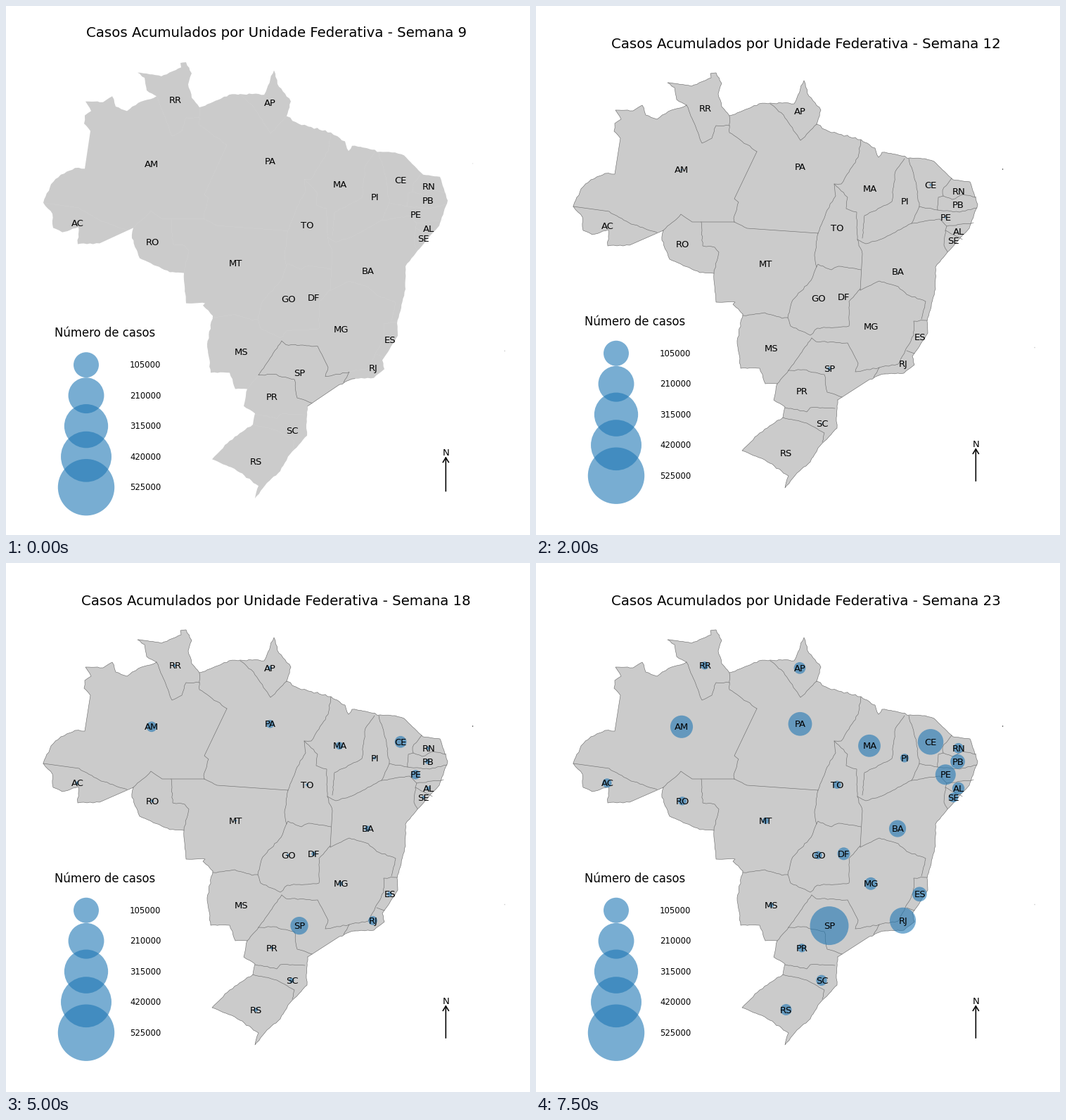
Animation of 745x752 px, one loop 8 s. Source, as a matplotlib script:

```python
import math
import random

import matplotlib.pyplot as plt
from matplotlib.animation import FuncAnimation
from matplotlib.patches import Circle, Polygon

W, H, DPI = 745, 752, 128
PT = 72 / DPI            # points per pixel
MID = 390                # map row that stays put while the height changes
STRETCH = {9: 1.051, 10: 1.0135, 11: 1.0072}
LAST_WEEK = 23
LAND, DARK, LIGHT, BLUE = "#cbcbcb", "#6a6a6a", "#e0e0e0", "#1f77b4"

# state: label position and thousands of cases in the last week
STATES = {
    "RR": (240, 145.5, 6), "AP": (375, 149, 13), "AM": (207, 232.5, 48),
    "PA": (375.5, 228.5, 53), "MA": (474, 259.5, 47), "CE": (561, 254, 62),
    "RN": (600.5, 263, 10), "PI": (524, 277, 7), "PB": (599.5, 282, 20),
    "PE": (582.3, 300.5, 39), "AL": (600.5, 320, 14), "SE": (593.5, 333, 9),
    "TO": (428, 315, 6), "AC": (101, 312.5, 8), "RO": (208, 338, 7),
    "MT": (326.5, 366, 4), "BA": (514, 377.3, 27), "GO": (401, 415, 6),
    "DF": (437.5, 413, 15), "MG": (476, 455.5, 15), "ES": (545.3, 470.5, 20),
    "MS": (334.5, 486, 2), "SP": (417, 515.3, 140), "RJ": (521.5, 508, 64),
    "PR": (378, 547, 7), "SC": (406, 593, 11), "RS": (355.5, 634.7, 12),
}
EARLY_HIT = {"SP", "AM", "CE", "PE", "SC"}   # these grow more slowly later on


def cases(state, week):
    """Thousands of cases: doublings counted back from the last week."""
    back = LAST_WEEK - week
    rate = .4 if state in EARLY_HIT else .57
    return STATES[state][2] * 2 ** -(rate * back + .0019 * back ** 3)


rng = random.Random(4)
outline, coasts, borders = [], [], []


def rough(points, amp):
    """Join key points with small irregular steps; long stretches stay straight."""
    path = [points[0]]
    for (x0, y0), (x1, y1) in zip(points, points[1:]):
        length = math.hypot(x1 - x0, y1 - y0)
        steps = max(1, int(length / 4)) if length < 48 else 1
        for i in range(1, steps):
            t = i / steps
            path.append((x0 + (x1 - x0) * t + rng.uniform(-amp, amp),
                         y0 + (y1 - y0) * t + rng.uniform(-amp, amp)))
        path.append((x1, y1))
    return path


def coast(week, *points, amp=.8):
    path = rough(points, amp)
    outline.extend(path)
    coasts.append((week, path))


def border(week, *points):
    borders.append((week, rough(points, .8)))


# Outer edge, clockwise from the far west; the number is the week it turns dark.
coast(11, (53, 285), (64, 260), (78, 247), (98, 238), (112, 239), (120, 188), (111, 178),
      (112, 167), (121, 161), (113, 148), (138, 149), (151, 141), (156, 155), (172, 161),
      (188, 150), (214, 141))
coast(12, (214, 141), (200, 133), (197, 116), (187, 109), (221, 114), (249, 102),
      (248, 96), (256, 95), (264, 110), (259, 125), (264, 143), (275, 156), (298, 147),
      (317, 139), (350, 138), (367, 139), (381, 106), (388, 128), (405, 148), (399, 168))
coast(12, (399, 168), (412, 176), (430, 182), (462, 190), (482, 202), (487, 215),
      (492, 208), (532, 216), amp=1.3)
coast(11, (532, 216), (553, 217), (566, 221), (593, 247), (617, 250), (628, 282),
      (616, 316), (585, 350), amp=.4)
coast(10, (585, 350), (568, 371), (568, 402), (556, 448), (557, 465), (535, 498),
      (538, 510), (523, 522), (496, 523), amp=.5)
coast(9, (496, 523), (474, 531), (429, 560), amp=1.3)
coast(11, (429, 560), (427, 585), (428, 600), (404, 625), (390, 648), (371, 664),
      (354, 685), (359, 668), (325, 645), (293, 632), (318, 607), (351, 585), (354, 570),
      (338, 560), (343, 537), (326, 537), (318, 515), (291, 515), (286, 476), (294, 438))
coast(12, (294, 438), (280, 424), (283, 421), (256, 421), (253, 380), (233, 379),
      (190, 360), (179, 333), (181, 319), (133, 340), (102, 341), (103, 318), (80, 325),
      (67, 319), (66, 300), (53, 285))

# Inner borders: north
border(11, (53, 285), (104, 292), (132, 308), (172, 322))
border(12, (181, 319), (206, 296), (222, 307), (282, 307))
border(12, (235, 307), (237, 341), (254, 343), (260, 350), (253, 380))
border(12, (282, 307), (281, 302), (288, 279), (282, 274), (314, 207))
border(12, (214, 141), (222, 160), (236, 195), (250, 188), (256, 170), (275, 170))
border(12, (275, 156), (275, 180), (314, 207))
border(12, (333, 139), (352, 155), (376, 191), (399, 168))
border(12, (282, 307), (300, 316), (401, 323))
border(12, (401, 323), (414, 290), (426, 270), (424, 253), (434, 253), (458, 215),
       (462, 190))
border(12, (424, 253), (443, 272), (441, 288), (456, 293), (457, 332))
border(12, (464, 330), (467, 298), (506, 278), (511, 235), (524, 217))
border(12, (401, 323), (396, 355), (399, 371))

# Inner borders: north-east
border(11, (530, 217), (541, 255), (545, 285), (534, 309))
border(10, (457, 332), (464, 352), (461, 404))
border(10, (457, 332), (469, 338), (492, 331), (534, 309), (574, 303), (584, 313),
       (582, 319), (580, 340), (585, 349))
border(11, (545, 285), (571, 290), (572, 272), (579, 270), (578, 262), (591, 245))
border(11, (579, 270), (592, 275), (607, 268), (626, 272))
border(11, (571, 290), (602, 293), (627, 287))
border(11, (584, 313), (622, 308))
border(11, (582, 319), (606, 332))

# Inner borders: centre and south
border(11, (462, 375), (430, 370), (420, 375), (401, 367), (391, 390), (365, 418),
       (358, 443), (362, 455), (390, 468), (400, 458), (445, 455), (445, 420), (461, 402))
border(11, (294, 440), (325, 436), (350, 444), (358, 443))
border(9, (392, 472), (378, 492), (359, 518))
border(11, (359, 518), (343, 537))
border(9, (392, 472), (398, 477), (443, 479), (458, 508), (454, 520), (488, 514),
       (480, 528))
border(10, (488, 514), (515, 509), (537, 468), (537, 448), (556, 447))
border(10, (527, 490), (538, 494))
border(10, (461, 404), (488, 391), (515, 399), (527, 410), (554, 420), (548, 445))
border(9, (359, 518), (380, 517), (410, 524), (414, 549), (435, 556))
border(11, (354, 571), (385, 577), (390, 571), (425, 572))
border(11, (351, 585), (385, 593), (410, 607), (407, 620))

plt.rcParams["font.family"] = "DejaVu Sans"
fig = plt.figure(figsize=(W / DPI, H / DPI), dpi=DPI, facecolor="white")
ax = fig.add_axes([0, 0, 1, 1])


def draw(frame):
    week = max(9, 8 + frame)
    scale = STRETCH.get(week, 1)
    shift = 323 * (scale - 1)

    def fit(y):
        return MID + (y - MID) * scale

    def text(x, y, label, size):
        ax.text(x, y, label, size=size * PT, ha="center", va="baseline", zorder=5)

    def line(path, color, width):
        ax.plot(*zip(*path), color=color, lw=width * PT, snap=False, zorder=2)

    def map_line(path, color, width):
        line([(x, fit(y)) for x, y in path], color, width)

    def bubble(x, y, radius):
        ax.add_patch(Circle((x, y), radius, fc=BLUE, alpha=.6, lw=0, zorder=3))

    ax.clear()
    ax.set(xlim=(0, W), ylim=(H, 0))
    ax.axis("off")

    ax.add_patch(Polygon([(x, fit(y)) for x, y in outline], fc=LAND, lw=0, zorder=1))
    for start, path in borders:
        if week < start:
            map_line(path, LIGHT, .7 if week == 11 else .15)
    for start, path in borders + coasts:
        if week >= start:
            map_line(path, DARK, .6)
    for x, y, strength in ((663.5, 232, .7 if week > 10 else .1), (709, 485.5, .2)):
        ax.add_patch(Circle((x, fit(y)), .8, fc="black", alpha=strength, lw=0))

    for state, (x, y, _) in STATES.items():
        bubble(x, fit(y) + .3, 2.32 * math.sqrt(cases(state, week)))
        text(x + .4, fit(y) + 4.8, state, 13.1)

    text(384.3, 60.5 - shift,
         f"Casos Acumulados por Unidade Federativa - Semana {week}", 19.72)
    text(140.5, 454 + shift, "Número de casos", 16.5)
    for i in range(1, 6):
        y = 450.2 + 43.5 * i + shift
        bubble(114, y, 40.2 * math.sqrt(i / 5))
        text(198.3, y + 4.2, str(105000 * i), 11.6)

    x, top, bottom = 625.3, fit(629.8), fit(675)
    text(x + .2, fit(622.2) + 4.8, "N", 13.1)
    line([(x, bottom), (x, top)], "black", 1.6)
    line([(x - 4, top + 6.5), (x, top), (x + 4, top + 6.5)], "black", 1.6)
    return []


anim = FuncAnimation(fig, draw, frames=16, interval=500, repeat=True, repeat_delay=0)
plt.show()
```
